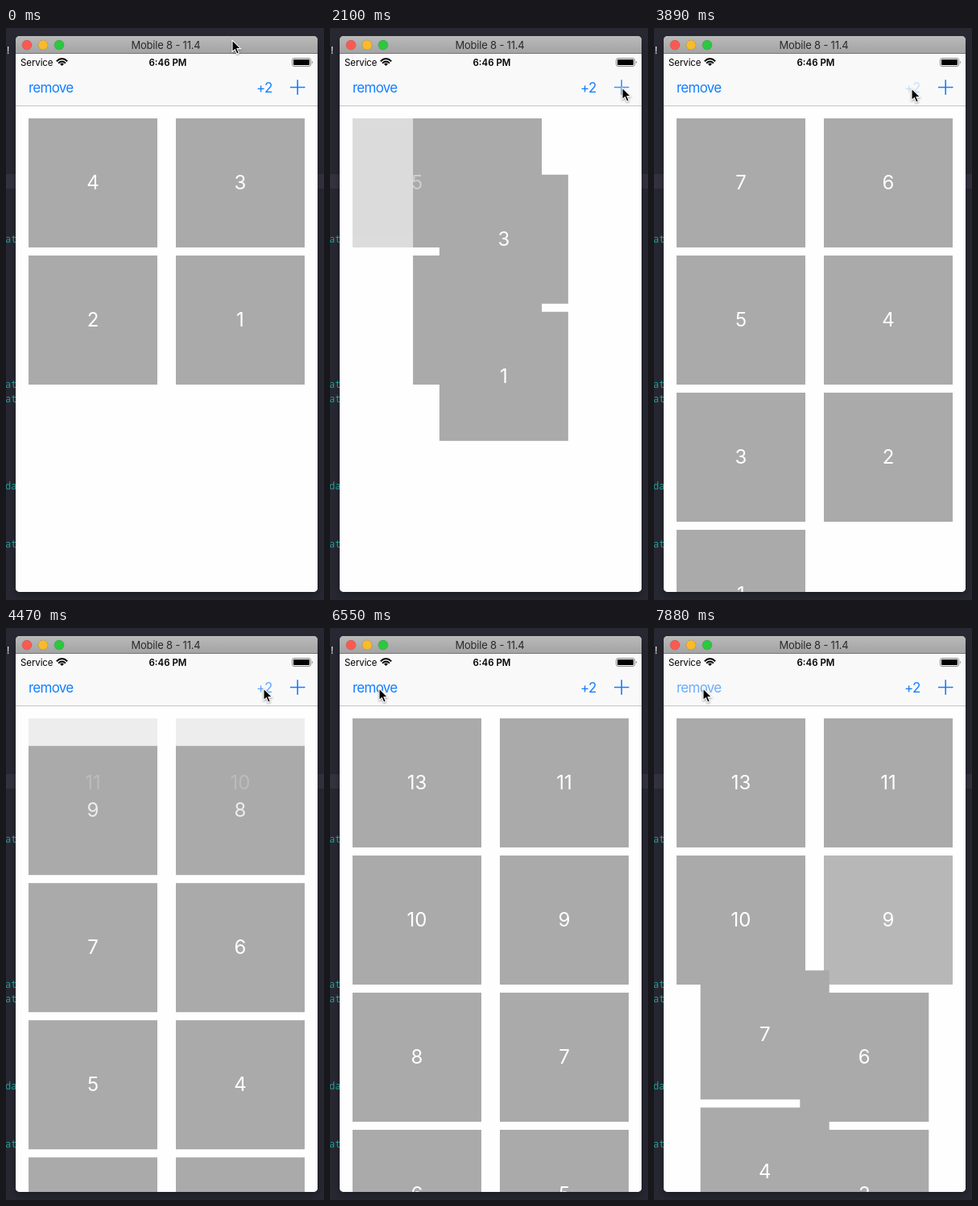
Recreate the animation shown at these times as an HTML page. Size 395 px wide and 709 px high, loop 8000 ms.

```html
<!DOCTYPE html>
<html lang="en">
<head>
<meta charset="utf-8">
<title>Grid insert and remove</title>
<style>
  html, body { margin: 0; width: 100%; height: 100%; overflow: hidden; background: #262630; }
  #stage { position: relative; width: 395px; height: 709px; overflow: hidden; font-family: Inter, sans-serif; }
  svg { position: absolute; left: 0; top: 0; }
  .code { font: 12px "Noto Sans Mono", monospace; fill: #1f9d92; }
  .button { font-size: 17px; letter-spacing: -.75px; fill: #147eff; }
  #grid { position: absolute; left: 12px; top: 97px; width: 375px; height: 602px; overflow: hidden;
          background: #fefefe; border-radius: 0 0 5px 5px; }
  .cell { position: absolute; left: 0; top: 0; width: 160px; height: 160px; background: #aaa; color: #fff;
          font-size: 24px; line-height: 160px; text-align: center; }
  #cursor { overflow: visible; filter: drop-shadow(0 1px 1px #0006); }
</style>
</head>
<body>
<div id="stage">
  <svg width="395" height="709">
    <defs>
      <linearGradient id="bar" x2="0" y2="1">
        <stop stop-color="#bababa"/><stop offset="1" stop-color="#a2a2a2"/>
      </linearGradient>
      <filter id="soft"><feGaussianBlur stdDeviation="6"/></filter>
    </defs>
    <rect width="395" height="709" fill="#282833"/>
    <rect y="181" width="395" height="18" fill="#343340"/>
    <rect x="12" y="18" width="375" height="685" fill="#000" opacity=".3" filter="url(#soft)"/>
    <text class="code" x="-1" y="32" style="fill:#eee">!</text>
    <g id="code" class="code"></g>

    <rect x="12" y="10" width="375" height="689" rx="5" fill="#f9f9f9"/>
    <path d="M12 32V15a5 5 0 0 1 5-5H382a5 5 0 0 1 5 5V32Z" fill="url(#bar)"/>
    <path d="M12 31.5H387" stroke="#777"/>
    <g stroke="#0003" stroke-width=".6">
      <circle cx="26" cy="21" r="6" fill="#fb5a52"/>
      <circle cx="46" cy="21" r="6" fill="#f9bb2d"/>
      <circle cx="66" cy="21" r="6" fill="#2bc840"/>
    </g>
    <text x="198.5" y="26" font-size="13" letter-spacing="-.2" text-anchor="middle" fill="#2a2a2a">Mobile 8 - 11.4</text>

    <text x="18" y="46.5" font-size="11.5" letter-spacing="-.1">Service</text>
    <text x="201" y="46.5" font-size="11.5" font-weight="600" text-anchor="middle">6:46 PM</text>
    <g fill="none" stroke="#000" stroke-width="1.9">
      <path d="M62.8 41.2Q69.5 35 76.2 41.2M65 43.6Q69.5 39.6 74 43.6"/>
      <path d="M69.5 47L67 44.6Q69.5 42.6 72 44.6Z" fill="#000" stroke="none"/>
    </g>
    <rect x="355.5" y="37.5" width="23" height="10" rx="2.5" fill="none" stroke="#888"/>
    <rect x="357" y="39" width="20" height="7" rx="1" fill="#000"/>
    <path d="M380 41q1.5 1.5 0 3" fill="#888" stroke="#888" stroke-width=".7"/>

    <text id="remove" class="button" x="28" y="80">remove</text>
    <text id="addTwo" class="button" x="311" y="80">+2</text>
    <path id="addOne" d="M353 73.5H371.5M362.2 64.3V82.7" stroke="#147eff" stroke-width="1.6"/>
    <path d="M12 96.5H387" stroke="#c4c4c4"/>
  </svg>
  <div id="grid"></div>
  <svg id="cursor" width="14" height="20">
    <path d="M0 0V14.5L3.4 11.6L5.7 17L8.3 15.9L6 10.6H10.6Z" stroke="#fff" stroke-width="1.1"/>
  </svg>
</div>
<script>
const LOOP = 8000, MOVE_TIME = 300, FADE_TIME = 250, PRESS_TIME = 90;
const FIRST_STEP = 1350, STEP = 148.4;
const el = id => document.getElementById(id);

// Each tap adds new items at the front or removes one by label.
const taps = [
  { at: 1960, button: "addOne", add: [5] },
  { at: 2370, button: "addOne", add: [6] },
  { at: 2800, button: "addOne", add: [7] },
  { at: 3930, button: "addTwo", add: [9, 8] },
  { at: 4380, button: "addTwo", add: [11, 10] },
  { at: 4830, button: "addTwo", add: [13, 12] },
  { at: 6150, button: "remove", drop: 12 },
  { at: 6700, button: "remove", drop: 8 },
  { at: 7250, button: "remove", drop: 5 },
  { at: 7803, button: "remove", drop: 9 }
];
const cursorPath = [
  { from: 0, to: 0, x: 281, y: 15 },
  { from: 1250, to: 1780, x: 363, y: 74 },
  { from: 3120, to: 3440, x: 320, y: 75 },
  { from: 5230, to: 5660, x: 61, y: 75 }
];

for (const [text, y] of [["at", 266], ["at", 446], ["at", 464], ["da", 572], ["at", 644]])
  el("code").innerHTML += `<text x="-1" y="${y}">${text}</text>`;

const cells = {};
for (let label = 1; label <= 13; label++) {
  const cell = cells[label] = document.createElement("div");
  cell.className = "cell";
  cell.textContent = label;
  el("grid").append(cell);
}

const clamp = v => Math.min(1, Math.max(0, v));
const ease = v => v * v * (3 - 2 * v);
const mix = (a, b, k) => a + (b - a) * k;
const slot = i => ({ x: 16 + 183 * (i % 2), y: 15 + 170 * Math.floor(i / 2) });

function applyTap(items, tap) {
  return tap.add ? [...tap.add, ...items] : items.filter(label => label !== tap.drop);
}

function drawGrid(t) {
  let before = [], after = [4, 3, 2, 1], progress = 1;
  before = after;
  for (const tap of taps) {
    if (t < tap.at) break;
    before = after;
    after = applyTap(before, tap);
    progress = ease(clamp((t - tap.at) / MOVE_TIME));
  }
  for (const label in cells) {
    const oldIndex = before.indexOf(+label), newIndex = after.indexOf(+label);
    const inserted = oldIndex < 0, removed = newIndex < 0;
    const a = slot(inserted ? newIndex : oldIndex), b = slot(removed ? oldIndex : newIndex);
    const style = cells[label].style;
    style.display = inserted && removed ? "none" : "";
    style.opacity = inserted ? progress : removed ? 1 - progress : 1;
    style.zIndex = inserted ? 50 : removed ? 0 : newIndex + 1;
    style.transform = `translate(${mix(a.x, b.x, progress)}px, ${mix(a.y, b.y, progress)}px)`;
  }
}

function drawButtons(t) {
  const opacity = { addOne: 1, addTwo: 1, remove: 1 };
  for (const { at, button } of taps) {
    if (t < at - PRESS_TIME) break;
    const rest = 1 - clamp((t - at) / FADE_TIME);
    opacity[button] = 1 - 0.8 * rest * rest;
  }
  for (const id in opacity) el(id).style.opacity = opacity[id];
}

function drawCursor(t) {
  let { x, y } = cursorPath[0];
  for (const stop of cursorPath.slice(1)) {
    const k = ease(clamp((t - stop.from) / (stop.to - stop.from)));
    x = mix(x, stop.x, k);
    y = mix(y, stop.y, k);
  }
  el("cursor").style.transform = `translate(${x}px, ${y}px)`;
}

function frame(now) {
  const time = now % LOOP;
  const t = time < FIRST_STEP ? 0 : FIRST_STEP + Math.floor((time - FIRST_STEP) / STEP) * STEP;
  drawGrid(t);
  drawButtons(t);
  drawCursor(t);
  requestAnimationFrame(frame);
}
frame(0);
</script>
</body>
</html>
```
